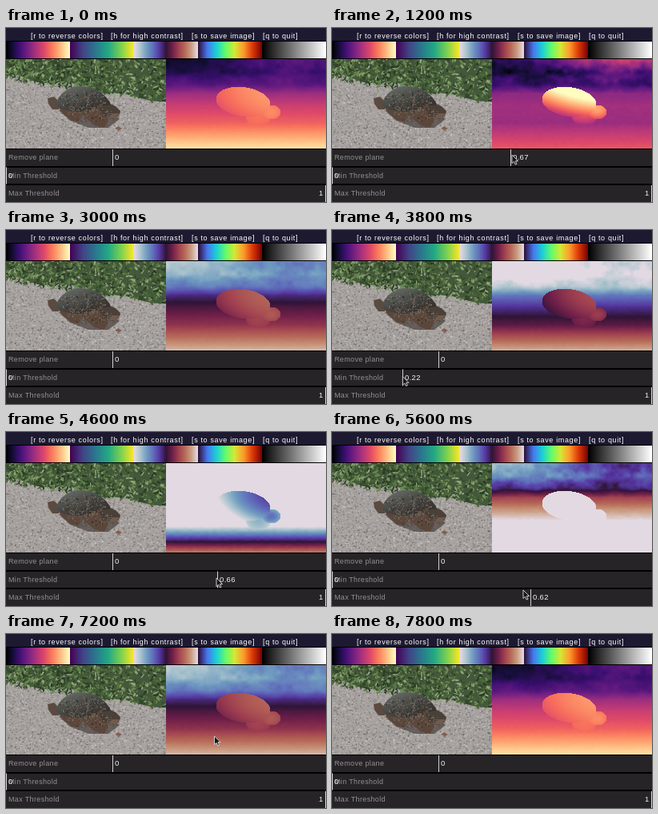
Animation, 400 px wide and 218 px high, one loop 8 s. Source, as an HTML page with a canvas:

```html
<!DOCTYPE html>
<html lang="en">
<head>
<meta charset="utf-8">
<title>Depth viewer</title>
<style>
html, body { margin: 0; width: 100%; height: 100%; overflow: hidden; background: #000; }
canvas, svg { position: absolute; left: 0; top: 0; width: 400px; height: 218px; display: block; }
text { font-family: "Liberation Sans", Arial, sans-serif; font-size: 9px; white-space: pre; }
.head { fill: #fff; letter-spacing: .65px; }
.label { fill: #949194; letter-spacing: .35px; }
.value { fill: #f4f4f4; letter-spacing: .35px; font-size: 9.5px; }
</style>
</head>
<body>
<canvas id="view" width="400" height="218"></canvas>
<svg id="ui" viewBox="0 0 400 218">
  <g class="heads"></g>
  <g class="rows"></g>
  <path id="cursor" d="M0 0V10.5L2.5 8.3L4.2 12L6 11.2L4.4 7.6H7.6Z" fill="#161616" stroke="#ddd" stroke-width=".9"/>
</svg>
<script>
const LOOP = 8000, STEP = 200;
const W = 200, H = 112, TOP = 39;
const ctx = document.getElementById('view').getContext('2d');
const ui = document.getElementById('ui');
const cursor = document.getElementById('cursor');

const clamp = (v, a = 0, b = 1) => Math.min(b, Math.max(a, v));
const mix = (a, b, k) => a + (b - a) * k;

// Linear interpolation in a table of [position, value...] rows
function sample(table, t, col = 1) {
  if (t <= table[0][0]) return table[0][col];
  for (let i = 1; i < table.length; i++) {
    const a = table[i - 1], b = table[i];
    if (t <= b[0]) return mix(a[col], b[col], (t - a[0]) / (b[0] - a[0]));
  }
  return table[table.length - 1][col];
}

function random(seed) {
  return () => (seed = (seed * 16807) % 2147483647) / 2147483647;
}

// --- colour maps ---
function palette(stops) {
  const list = stops.split(' ').map(h => [0, 2, 4].map(i => parseInt(h.substr(i, 2), 16)));
  return Array.from({ length: 256 }, (_, i) => {
    const p = i / 255 * (list.length - 1), n = Math.min(list.length - 2, Math.floor(p));
    return list[n].map((c, j) => Math.round(mix(c, list[n + 1][j], p - n)));
  });
}
const magma = palette('000004 140e36 3b0f70 641a80 8c2981 b73779 de4968 f7705c fe9f6d fecf92 fcfdbf');
const viridis = palette('440154 414487 2a788e 22a884 7ad151 fde725');
const twilight = palette('e2d9e2 a8c2cc 6f9bc0 5f6cba 5536a0 2f1436 6e1f49 a04050 b76a58 ca9d82 e2d9e2');
const turbo = palette('30123b 4777ef 1bd0d5 61fc6c d2e935 fe9b2d d93806 7a0403');
const gray = palette('000000 ffffff');

function drawBars() {
  [magma, viridis, twilight, turbo, gray].forEach((map, n) => {
    for (let x = 0; x < 80; x++) {
      ctx.fillStyle = `rgb(${map[Math.round(x / 79 * 255)]})`;
      ctx.fillRect(n * 80 + x, 17, 1, 21);
    }
  });
}

// --- photo ---
function shape(color, d) {
  ctx.fillStyle = color;
  ctx.fill(new Path2D(d));
}

function leaf(color, x, y, rx, ry, angle) {
  ctx.fillStyle = color;
  ctx.beginPath();
  ctx.ellipse(x, y, rx, ry, angle, 0, 7);
  ctx.fill();
}

function drawPhoto() {
  const rnd = random(71);
  ctx.save();
  ctx.beginPath();
  ctx.rect(0, TOP, W, H);
  ctx.clip();

  ctx.fillStyle = '#a7a29f';
  ctx.fillRect(0, TOP, W, H);
  for (let i = 0; i < 4200; i++) {
    const y = 58 + rnd() * 93, c = 85 + rnd() * 140 | 0;
    ctx.fillStyle = `rgba(${c},${c - 4},${c - 6},.65)`;
    ctx.fillRect(rnd() * W, y, .8 + rnd() * 1.3, .8 + rnd() * .8);
  }

  shape('#43583a', 'M0 39H200V92Q182 93 165 87T130 82T95 74T60 68T28 64T0 60Z');
  const greens = ['#2a3a24', '#4a6238', '#6c8a55', '#33482b', '#93a67f', '#587a42'];
  for (let i = 0; i < 900; i++) {
    const x = rnd() * W, edge = 61 + x * .155 + rnd() * 5;
    const color = greens[rnd() * greens.length | 0];
    leaf(color, x, mix(TOP, edge, rnd()), 1 + rnd() * 2.8, .5 + rnd() * .9, rnd() * 3.1);
  }

  shape('rgba(55,48,44,.6)', 'M66 103L80 116L104 125L128 125L142 114L130 104Z');
  shape('#5b4a40', 'M52 88L60 86L68 94L66 102L58 102L53 95Z');
  shape('#5c463a', 'M63 94L69 105L82 116L91 117L96 110L111 122L123 125L127 117L131 102L112 94Z');
  shape('#4b4038', 'M117 98Q128 92 137 98L143 104Q143 111 134 114L121 111Z');
  shape('#705a4c', 'M127 107L142 107L137 113L126 113Z');
  const shell = new Path2D('M62 95Q68 79 83 74Q101 70 116 79Q128 87 131 96L111 99Q94 108 77 103Q66 102 62 95Z');
  const sheen = ctx.createLinearGradient(80, 72, 92, 106);
  sheen.addColorStop(0, '#686d68');
  sheen.addColorStop(.45, '#4b4e4a');
  sheen.addColorStop(1, '#38332f');
  ctx.fillStyle = sheen;
  ctx.fill(shell);
  for (let i = 0; i < 320; i++) {
    const a = rnd() * 6.28, r = Math.sqrt(rnd());
    const color = ['#2b2a28', '#666a64', '#69503f', '#80776e'][rnd() * 4 | 0];
    const low = i % 3 === 0;
    leaf(color, (low ? 105 : 96) + Math.cos(a) * r * 29, (low ? 108 : 91) + Math.sin(a) * r * (low ? 9 : 13), .9, .6, a);
  }
  shape('#815f50', 'M136 126l4 -3 5 3 -4 2z');
  ctx.restore();
}

// --- depth field ---
const hash = (x, y) => {
  const s = Math.sin(x * 127.1 + y * 311.7) * 43758.5453;
  return s - Math.floor(s);
};
function noise(x, y) {
  const i = Math.floor(x), j = Math.floor(y);
  const u = (x - i) ** 2 * (3 - 2 * (x - i)), v = (y - j) ** 2 * (3 - 2 * (y - j));
  return mix(mix(hash(i, j), hash(i + 1, j), u), mix(hash(i, j + 1), hash(i + 1, j + 1), u), v) - .5;
}
const fall = [[39, .08], [55, .14], [62, .2], [70, .26], [82, .44], [97, .55], [110, .62], [118, .66], [130, .77], [151, .95]];
const oval = (x, y, cx, cy, rx, ry, tilt = 0) => {
  const dx = x - cx, dy = y - cy - dx * tilt;
  return (dx / rx) ** 2 + (dy / ry) ** 2;
};

function depthAt(x, y) {
  const leafy = clamp((86 - y) / 22);
  let d = sample(fall, y);
  d += clamp((x - 30) / 110) * clamp((72 - y) / 33) * .17;
  d += leafy * (noise(x / 19, y / 11) * .08 + noise(x / 7, y / 6) * .05 + noise(x / 3, y / 3) * .02);
  d += noise(x / 5, y / 3) * .008;
  const body = oval(x, y, 115, 108, 16, 15.5), head = oval(x, y, 131, 105, 12, 9);
  const shell = oval(x, y, 96, 92, 34, 18.5, .1);
  if (body < 1) d = Math.max(d, .71 - body * .03);
  if (head < 1) d = Math.max(d, .76 - head * .05);
  if (shell < 1) d = .71 + (x - 85) * .0022 - (y - 90) * .0025 - shell * .025;
  return clamp(d, .02, 1);
}

const depth = new Float32Array(W * H);
for (let i = 0; i < W * H; i++) depth[i] = depthAt(i % W, TOP + Math.floor(i / W));
const picture = ctx.createImageData(W, H);

function drawDepth(map, plane, low, high) {
  const scale = 1 - .76 * plane;
  for (let i = 0; i < W * H; i++) {
    const slope = Math.floor(i / W) / (H - 1);
    const d = (depth[i] - .94 * plane * slope) / scale;
    const c = map[Math.round(clamp((d - low) / (high - low)) * 255)];
    picture.data.set(c, i * 4);
    picture.data[i * 4 + 3] = 255;
  }
  ctx.putImageData(picture, W, TOP);
}

// --- interface ---
function add(parent, tag, attrs, content = '') {
  const el = document.createElementNS('http://www.w3.org/2000/svg', tag);
  for (const k in attrs) el.setAttribute(k, attrs[k]);
  el.textContent = content;
  return parent.appendChild(el);
}

const heads = ui.querySelector('.heads'), rows = ui.querySelector('.rows');
[[31, '[r to reverse colors]'], [131, '[h for high contrast]'], [232, '[s to save image]'], [321, '[q to quit]']]
  .forEach(([x, s]) => add(heads, 'text', { class: 'head', x, y: 12.5 }, s));

function slider(y, name, from, to) {
  add(rows, 'text', { class: 'label', x: 3, y: y + 13 }, name);
  const line = add(rows, 'rect', { y, width: 1, height: 21, fill: '#d0d0d0' });
  const value = add(rows, 'text', { class: 'value', y: y + 13 });
  return v => {
    const x = Math.round(clamp((v - from) / (to - from) * 400, 0, 399));
    line.setAttribute('x', x);
    value.textContent = String(Math.round(v * 100) / 100);
    value.setAttribute('x', x > 375 ? (v === 1 ? 391 : x - 22) : x + 3);
  };
}
const setPlane = slider(152, 'Remove plane', -1, 2);
const setLow = slider(174.5, 'Min Threshold', 0, 1);
const setHigh = slider(197, 'Max Threshold', 0, 1);

// --- motion ---
const planeKeys = [[600, 0], [1200, .67], [1400, .8], [2200, 0]];
const lowKeys = [[3400, 0], [4600, .66], [4800, 0]];
const highKeys = [[5000, 1], [5200, .87], [5600, .62], [6400, .24], [7000, 1]];
const mouseKeys = [
  [400, 118, 172], [600, 134, 162], [1200, 225, 159], [1400, 242, 160], [2200, 135, 160],
  [2600, 192, 24], [3200, 20, 192], [3400, 1, 184], [4600, 263, 183], [4800, 20, 184],
  [5000, 391, 198], [5200, 340, 198], [5600, 239, 198], [6400, 97, 192], [7000, 391, 196],
  [7400, 130, 60], [7600, 40, 24]
];
const within = (t, a, b) => t >= a && t <= b;

let shown = -1;
function draw(now) {
  const t = Math.floor(now % LOOP / STEP) * STEP;
  if (t === shown) return;
  shown = t;
  const plane = sample(planeKeys, t), low = sample(lowKeys, t), high = sample(highKeys, t);
  setPlane(plane);
  setLow(low);
  setHigh(high);
  drawDepth(within(t, 2600, 7400) ? twilight : magma, plane, low, high);
  const visible = within(t, 400, 2600) || within(t, 3200, 7600);
  cursor.setAttribute('visibility', visible ? 'visible' : 'hidden');
  cursor.setAttribute('transform', `translate(${sample(mouseKeys, t)} ${sample(mouseKeys, t, 2)})`);
}

ctx.fillStyle = '#000';
ctx.fillRect(0, 0, 400, 218);
ctx.fillStyle = '#1d1930';
ctx.fillRect(0, 0, 400, 16);
ctx.fillStyle = '#262427';
for (const y of [152, 175, 197]) ctx.fillRect(0, y, 400, y === 175 ? 20 : 21);
drawBars();
drawPhoto();

const start = performance.now();
function tick() {
  draw(performance.now() - start);
  requestAnimationFrame(tick);
}
tick();
</script>
</body>
</html>
```
